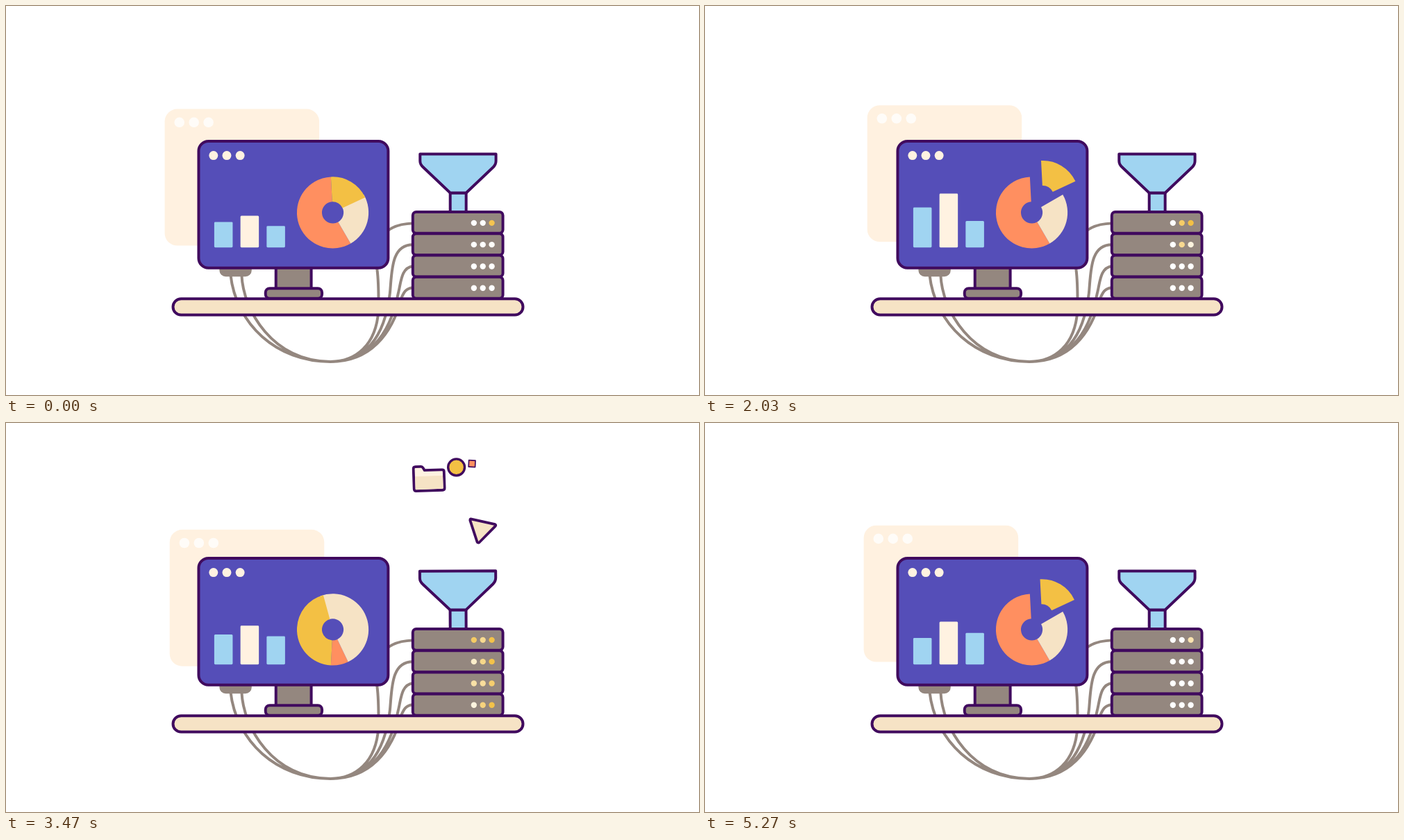
Write an HTML page with a canvas that moves like this. It is 998 px wide and 561 px high and loops after 5.31 s.

```html
<!DOCTYPE html>
<html lang="en">
<head>
<meta charset="utf-8">
<title>Data pipeline</title>
<style>
html, body { margin: 0; height: 100%; overflow: hidden; background: #fff; }
canvas { display: block; }
</style>
</head>
<body>
<canvas id="stage" width="998" height="561"></canvas>
<script>
const ctx = document.getElementById('stage').getContext('2d');
const LOOP = 5310, CYCLE = 2670, TAU = Math.PI * 2, DEG = Math.PI / 180;
const ink = '#400a5e', indigo = '#554eb8', gray = '#94877f', cream = '#f6e3c5',
      pale = '#fff2e1', blue = '#a0d4f1', orange = '#ff8f60', yellow = '#f3c044';

const clamp = v => Math.min(1, Math.max(0, v));
const mix = (a, b, u) => a + (b - a) * u;
// Eased 0 to 1 between two times, and a soft hump around one.
const ease = (t, from, to) => (1 - Math.cos(clamp((t - from) / (to - from)) * Math.PI)) / 2;
const hump = (t, centre, width) => 1 - ease(Math.abs(t - centre), 0, width);
const noise = n => Math.abs(Math.sin(n * 127.1 + 3.7) * 43758.5) % 1;

function paint(path, fill, line, width = 4) {
  if (fill) { ctx.fillStyle = fill; ctx.fill(path); }
  if (line) { ctx.strokeStyle = line; ctx.lineWidth = width; ctx.stroke(path); }
}

function box(x, y, w, h, r, fill, line) {
  const p = new Path2D();
  p.roundRect(x, y, w, h, r);
  paint(p, fill, line);
}

function dot(x, y, r, fill) {
  const p = new Path2D();
  p.arc(x, y, r, 0, TAU);
  paint(p, fill);
}

const cables = new Path2D(`
  M324 388 C332 460 390 514 468 514
  M340 388 C342 440 385 514 468 514
  M587 314 C535 316 531 350 536 385 Q538 405 537.5 440 C534 490 505 514 468 514
  M587 345 C555 345 557 385 554 415 C545 490 510 514 468 514
  M587 376 C570 378 570 400 566 415 C553 480 520 514 468 514
  M587 407 C577 408 574 414 571 421 C557 475 525 514 468 514`);
const cup = new Path2D('M597.5 214H707V224Q707 229 703 233L664 270H641L602 233Q597.5 229 597.5 224Z');
const spout = new Path2D('M641 270H664V298H641Z');

// Things that drop into the funnel, each drawn around its own centre.
const kind = (turn, spin, ...layers) => ({ turn, spin, layers });
const sheet = kind(-97, 0.36,
  ['M-12 -17.5H7L14.5 -9V15Q14.5 17.5 12 17.5H-12Q-14.5 17.5 -14.5 15V-15Q-14.5 -17.5 -12 -17.5Z', indigo, ink],
  ['M6 -15.5V-8H12.5Z', blue]);
const wedge = kind(-31, 0.13,
  ['M-15 -14L20 -6Q22 -5 20 -3L-3 20Q-5 21 -6 19L-16 -12Q-16 -14 -15 -14Z', cream, ink]);
const folder = kind(7.5, -0.086,
  ['M-19 -18H-11Q-9 -18 -8 -16L-6 -12.5H19Q22 -12.5 22 -10V14Q22 17 19 17H-19Q-22 17 -22 14V-15Q-22 -18 -19 -18Z', pale, ink],
  ['M-20 -4H20V14Q20 15 18 15H-18Q-20 15 -20 14Z', cream]);
const coin = kind(0, 0, ['M13.4 0A13.4 13.4 0 1 1 -13.4 0A13.4 13.4 0 1 1 13.4 0Z', yellow, ink]);
const block = kind(10, -0.2, ['M-10.7 -10.7H10.7V10.7H-10.7Z', orange, ink]);
for (const k of [sheet, wedge, folder, coin, block])
  k.layers = k.layers.map(([d, ...colours]) => [new Path2D(d), ...colours]);

// Spawn time, x at the top, x at the rim, height of the bounce on the rim.
const item = (type, spawn, x0, x1, hop = 0) => ({ type, spawn, x0, x1, hop });
const items = [
  item(sheet, 305, 620, 640),
  item(wedge, 565, 694, 680),
  item(block, 764, 673, 667),
  item(coin, 972, 655, 650),
  item(sheet, 988, 680, 692),
  item(coin, 738, 654, 628, 53),
  item(folder, 690, 609, 614, 12)
];

const TOP = 56, RIM = 205, LAND = 323, BOUNCE = 500, SINK = 130;
// Speeds up, then drops at a steady rate.
const fall = age => age < 150 ? 0.002 * age * age : 45 + 0.6 * (age - 150);

function drawItem({ type, spawn, x0, x1, hop }, t) {
  const age = t - spawn, rest = hop ? BOUNCE : 0;
  const sink = clamp((age - LAND - rest) / SINK);
  if (age <= 0 || sink === 1) return;
  const bounce = rest ? hop * Math.sin(clamp((age - LAND) / rest) * Math.PI) : 0;
  const size = ease(age, 0, 80) * (1 - 0.7 * sink);
  ctx.save();
  ctx.translate(mix(mix(x0, x1, clamp(age / 400)), 652, sink),
    Math.min(RIM, TOP + fall(age)) - bounce + 45 * sink);
  ctx.rotate((type.turn + type.spin * age) * DEG);
  ctx.scale(size, size);
  type.layers.forEach(([path, fill, line]) => paint(path, fill, line, 3.8));
  ctx.restore();
}

function drawFunnel(t) {
  const swing = t > 790 && t < 1840
    ? -2.2 * Math.sin((t - 790) / 262.5 * Math.PI) * clamp((1840 - t) / 500) : 0;
  ctx.save();
  ctx.translate(652, 297);
  ctx.rotate(swing * DEG);
  ctx.translate(-652, -297);
  paint(spout, blue, ink);
  paint(cup, blue, ink);
  ctx.restore();
}

// Light runs down each column from these times; all lamps flash as the load arrives.
const runs = [[850], [1030, 1980], [0, 1, 2, 3, 4].map(n => 30 + n * CYCLE / 4)];

function drawServers(t) {
  const flash = hump(t, 825, 220);
  for (let row = 0; row < 4; row++) {
    const y = 297.5 + row * 31.35;
    box(587, y, 130, 31, 5, gray, ink);
    runs.forEach((starts, col) => {
      const run = Math.max(...starts.map(s => hump(t, s + row * 130, 180)));
      const glow = Math.max(run, flash * clamp(0.4 * col + 0.5 * noise(row * 3 + col)));
      dot(675.2 + col * 12.9, y + 16, 4.2,
        `rgb(${255 - 12 * glow},${255 - 63 * glow},${255 - 187 * glow})`);
    });
  }
}

function slice(from, to, fill, shift = 0) {
  const x = 471.5 + 14.7 * shift, y = 298.5 - 21.2 * shift;
  const a = (from - 90) * DEG, b = (to - 90) * DEG;
  const p = new Path2D();
  p.arc(x, y, 51.7, a, b);
  p.arc(x, y, 15.6, b, a, true);
  p.closePath();
  paint(p, fill);
}

function drawPie(t, stay) {
  // Each edge makes two turns at its own pace.
  const a = -3 + 720 * ease(t, 370, 1640);
  const b = 65 + 720 * ease(t, 0, 1870);
  const c = 150 + 720 * ease(t, 55, 1535);
  const pop = (ease(t, 1800, 1960) + 0.1 * hump(t, 2030, 250)) * stay;
  slice(c, a + 360, orange);
  slice(b - 5, c, cream);
  slice(a, b, yellow, pop);
}

function drawBars(t, stay) {
  const bar = (i, base, small, tall, fill) => {
    const h = base + small * hump(t, 620 + 80 * i, 600)
      + tall * hump(t, 2030 + 190 * i, 680) * stay;
    box(300.5 + i * 37.8, 349 - h, 26.6, h, 1.5, fill);
  };
  bar(0, 37, 8, 21, blue);
  bar(1, 46, 11, 39, pale);
  bar(2, 31, 10, 18, blue);
}

function drawMonitor(t) {
  box(308, 370, 46.5, 21, 9, gray);
  box(389.5, 376, 51, 34, 0, gray, ink);
  box(374.5, 408, 81.5, 14.5, 6, gray, ink);
  box(278, 195.5, 273.5, 183, 14, indigo, ink);
  for (let i = 0; i < 3; i++) dot(299.4 + i * 19.2, 216, 6.5, pale);
  const stay = 1 - ease(t, 2605, 2665);
  drawBars(t, stay);
  drawPie(t, stay);
}

function drawCard(t) {
  const a = t / CYCLE * TAU;
  const x = 234.5 - 5.5 * Math.cos(a), y = 148.9 + 5.5 * Math.sin(a);
  box(x, y, 223, 197.3, 18, '#fff1e0');
  for (let i = 0; i < 3; i++) dot(x + 21.2 + i * 21, y + 19.2, 7.3, '#fffcf8');
}

function frame(now) {
  const t = now % LOOP % CYCLE;
  ctx.fillStyle = '#fff';
  ctx.fillRect(0, 0, 998, 561);
  ctx.save();
  ctx.scale(0.998, 0.998); // the scene is laid out 1000 units wide
  ctx.lineJoin = 'round';
  drawCard(t);
  paint(cables, null, gray);
  drawMonitor(t);
  items.forEach(it => drawItem(it, t));
  drawFunnel(t);
  drawServers(t);
  box(241, 423, 505, 23.5, 11.7, cream, ink);
  ctx.restore();
  requestAnimationFrame(frame);
}
requestAnimationFrame(frame);
</script>
</body>
</html>
```
